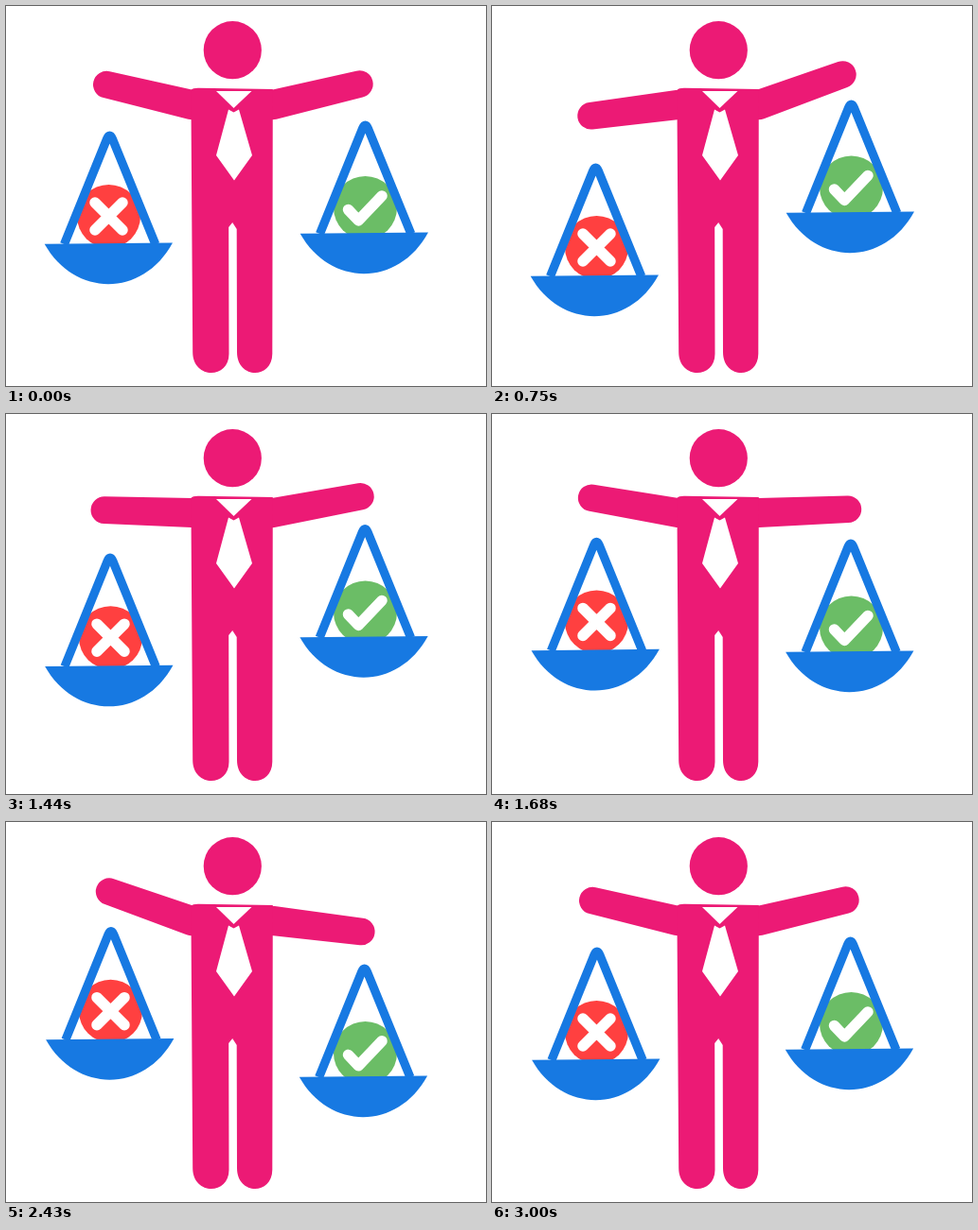
An HTML page with a canvas that plays this animation: 507 px wide and 402 px high, repeating every 3600 ms.

```html
<!DOCTYPE html>
<html lang="en">
<head>
<meta charset="utf-8">
<title>Weighing wrong and right</title>
<style>
  html, body { margin: 0; width: 100%; height: 100%; overflow: hidden; background: #fff; }
  canvas { display: block; width: 507px; height: 402px; }
</style>
</head>
<body>
<canvas id="stage"></canvas>
<script>
const W = 507, H = 402, LOOP = 3600, STEP = 30;
const PINK = '#ec1a75', BLUE = '#1779e2', RED = '#ff4040', GREEN = '#6bbd66', WHITE = '#fff';

const canvas = document.getElementById('stage');
const ctx = canvas.getContext('2d');
const ratio = window.devicePixelRatio || 1;
canvas.width = W * ratio;
canvas.height = H * ratio;

// Each property lists its value at rest, tipped left, tipped right and back at rest.
const left = {
  angle: [193.4, 172.7, 199.9, 193.4],
  panX: [108.5, 108.5, 109.9, 109.9],
  panY: [251, 285, 228.4, 251],
  ballX: [108.5, 110.5, 110.5, 110.5],
  ballY: [222.5, 255.5, 199, 222.5]
};
const right = {
  angle: [-13.5, -19.9, 8.1, -13.5],
  panX: [378.5, 378.5, 377.6, 377.6],
  panY: [240, 218, 270.5, 240],
  ballX: [379.5, 379.5, 379.5, 379.5],
  ballY: [213.5, 192, 246, 213.5]
};
const moves = [[0, 750], [1170, 1980], [2400, 3000]];

function pose(keys, t) {
  const out = {};
  for (const name in keys) {
    const k = keys[name];
    out[name] = moves.reduce((v, [from, to], i) => {
      const p = Math.min(1, Math.max(0, (t - from) / (to - from)));
      return v + (k[i + 1] - k[i]) * p;
    }, k[0]);
  }
  return out;
}

function disc(x, y, r, color) {
  ctx.fillStyle = color;
  ctx.beginPath();
  ctx.arc(x, y, r, 0, Math.PI * 2);
  ctx.fill();
}

function polygon(points, color) {
  ctx.fillStyle = color;
  ctx.beginPath();
  points.forEach(([x, y]) => ctx.lineTo(x, y));
  ctx.closePath();
  ctx.fill();
}

function strokeLines(lines, width, color) {
  ctx.strokeStyle = color;
  ctx.lineWidth = width;
  ctx.lineCap = ctx.lineJoin = 'round';
  ctx.beginPath();
  for (const line of lines) {
    line.forEach(([x, y], i) => i ? ctx.lineTo(x, y) : ctx.moveTo(x, y));
  }
  ctx.stroke();
}

function at(x, y, draw) {
  ctx.save();
  ctx.translate(x, y);
  draw();
  ctx.restore();
}

function arm(x, y, length, angle) {
  const q = Math.PI / 2;
  at(x, y, () => {
    ctx.rotate(angle * Math.PI / 180);
    ctx.fillStyle = PINK;
    ctx.beginPath();
    ctx.arc(0, 0, 15.6, q, -q);
    ctx.arc(length, 0, 14.3, -q, q);
    ctx.closePath();
    ctx.fill();
  });
}

function body() {
  disc(239.3, 46.7, 30.6, PINK);
  ctx.fillStyle = PINK;
  ctx.beginPath();
  ctx.moveTo(195.4, 89);
  ctx.quadraticCurveTo(197, 86.7, 203, 86.7);
  ctx.lineTo(281.8, 88);
  ctx.lineTo(281.3, 368);
  ctx.bezierCurveTo(281, 395, 244, 395, 244, 366);
  ctx.lineTo(243.7, 236);
  ctx.lineTo(239.2, 229);
  ctx.lineTo(235.2, 234);
  ctx.lineTo(235.5, 368);
  ctx.bezierCurveTo(235.5, 395, 197.2, 395, 197.2, 366);
  ctx.closePath();
  ctx.fill();
  polygon([[222, 90], [259.5, 90], [240.5, 108]], WHITE);
  polygon([[235, 109.5], [240.5, 112.5], [246, 109.5], [260, 158], [241, 184.5], [222, 158]], WHITE);
}

function cross() {
  strokeLines([[[-14.5, -14.5], [14.5, 14.5]], [[-14.5, 14.5], [14.5, -14.5]]], 11.5, WHITE);
}

function tick() {
  strokeLines([[[-18, 2], [-7.2, 13.4], [17.5, -12.6]]], 11.5, WHITE);
}

function pan() {
  ctx.strokeStyle = BLUE;
  ctx.lineWidth = 9.2;
  ctx.lineCap = 'butt';
  ctx.lineJoin = 'round';
  ctx.beginPath();
  ctx.moveTo(-47, 1);
  ctx.lineTo(-1.9, -110.5);
  ctx.quadraticCurveTo(1, -117.5, 3.9, -110.5);
  ctx.lineTo(49.3, 1);
  ctx.stroke();

  ctx.fillStyle = BLUE;
  ctx.beginPath();
  ctx.moveTo(-67.8, 0.8);
  ctx.lineTo(67.5, -0.5);
  ctx.bezierCurveTo(36, 57.5, -36, 57.5, -67.8, 0.8);
  ctx.fill();
}

function scale(s, color, mark) {
  disc(s.ballX, s.ballY, 33.5, color);
  at(s.ballX, s.ballY, mark);
  at(s.panX, s.panY, pan);
}

function draw(t) {
  const l = pose(left, t), r = pose(right, t);
  ctx.setTransform(ratio, 0, 0, ratio, 0, 0);
  ctx.fillStyle = WHITE;
  ctx.fillRect(0, 0, W, H);
  arm(196, 104.5, 92.2, l.angle);
  arm(282, 104.5, 94, r.angle);
  body();
  scale(l, RED, cross);
  scale(r, GREEN, tick);
}

const start = performance.now();
function loop() {
  const t = (performance.now() - start) % LOOP;
  draw(Math.floor(t / STEP) * STEP);
  requestAnimationFrame(loop);
}
loop();
</script>
</body>
</html>
```
